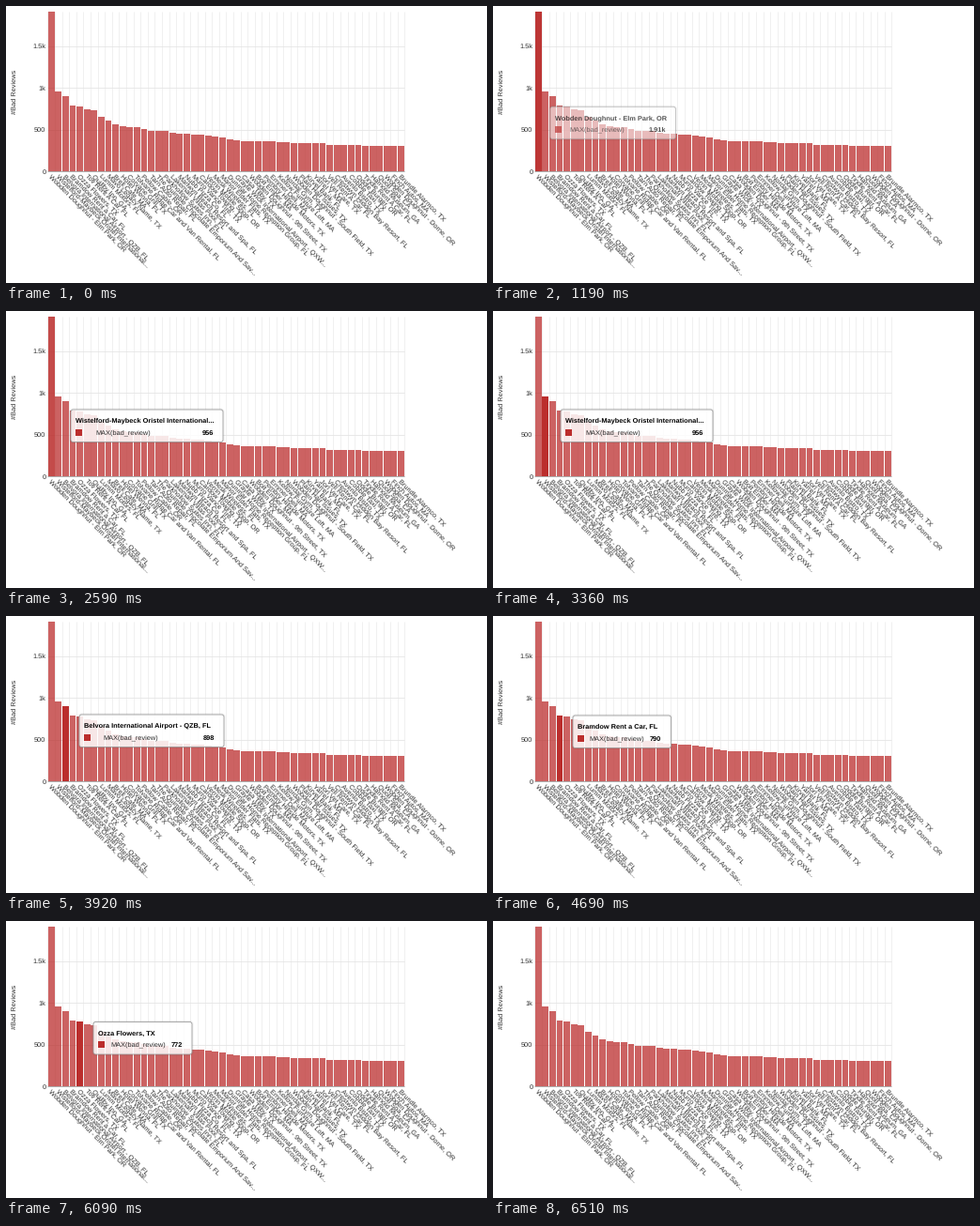
Recreate the animation shown at these times as a matplotlib script. Size 512x295 px, loop 7280 ms.

```python
import numpy as np
import matplotlib.pyplot as plt
from matplotlib.animation import FuncAnimation
from matplotlib.patches import FancyBboxPatch, Rectangle

W, H, DPI = 512, 295, 64
PX = 72 / DPI                      # points per pixel
LOOP, STEP = 7280, 70
LEFT, PITCH, BASE, SCALE = 44.3, 7.6, 176, 0.089
FONT = 7.4
RED = (0.735, 0.18, 0.175)
INK = "#2b2b2b"

# title, value, box width, offset of the measure name
TIPS = [
    ("Wobden Doughnut - Elm Park, OR", "1.91k", 133.5, 21),
    ("Wistelford-Maybeck Oristel International...", "956", 162, 26),
    ("Belvora International Airport - QZB, FL", "898", 154, 25),
    ("Bramdow Rent a Car, FL", "790", 104.5, 17.5),
    ("Ozza Flowers, TX", "772", 105, 18),
]

NAMES = [tip[0] for tip in TIPS] + """Tov Rent A Car, FL
Quillby Inn, GA
Lumm Motors, FL
Mavo Legacy Name, TX
Brell Cafe, MA
Hotel Wenna, FL
Corvane Grill, TX
Tolvane Ridge Car and Van Rental, FL
Pellow Cable, OR
Tarn Auto Repair, FL
The Quimble Chocolate Emporium And Sav...
Parkhollow Suites Inn, FL
Lakemarl Villas Pool, FL
Marlwyn Beach Resort and Spa, FL
Nubb Pizza Co, FL
Murro Vance Tire, TX
Cardow Towing, TX
Verrin Mobile Shop, OR
Mesk Wireless, FL
Manor Elder Flats, TX
Dunmar Home Reception Group, FL
Grayle Wick International Airport - QXW...
Casa Tilby, TX
Wobden Doughnut - 9th Street, TX
Bolt Ember, MA
Pembry Hillside Motors, TX
Emmer Deli, MA
Kellow Furniture Loft, MA
Nordal Gym, TX
Wobden Doughnut - South Field, TX
Plain Hair Issues, TX
Kirvel Bank, FL
Yarrel Y, MA
Jorl Vet Care, TX
Vell Rent A Car, FL
Crestwyn Hidden Bay Resort, FL
Avenlo Bistro, TX
Cobble Taxi, TX
Oddle Burger, OR
Tindle Rent A Car, FL
Harnold Museum, GA
Quoll Spa, CA
Wobden Doughnut - Dorne, OR
Finch Autos, MA
Brundle Alarmco, TX""".splitlines()

VALUES = [1910, 956, 898, 790, 772, 745, 730, 655, 605, 565,
          535, 530, 525, 510, 485, 482, 480, 465, 446, 444,
          441, 439, 430, 412, 402, 385, 370, 365, 362, 360,
          358, 356, 352, 346, 342, 340, 336, 335, 334, 318,
          316, 314, 312, 311, 306, 305, 304, 303, 302, 301]

# Moments when each bar becomes hovered; the last is the pointer leaving.
HOVER = [1050, 2590, 3640, 4410, 5390, 6160]
# Tooltip corner along the pointer's path: time, x, y
PATH = np.array([
    (1120, 60.5, 107.5), (1680, 63.5, 105.5), (2240, 63.5, 105.5),
    (2590, 69, 105), (2940, 72, 105), (3570, 72, 105), (3920, 78, 105),
    (4270, 80, 105.5), (4690, 85, 106), (5320, 85.3, 106),
    (5390, 92, 107), (5670, 93, 107.5),
])

plt.rcParams.update({"font.family": "Liberation Sans", "text.hinting": "none"})
fig = plt.figure(figsize=(W / DPI, H / DPI), dpi=DPI, facecolor="white")
ax = fig.add_axes([0, 0, 1, 1])
ax.set_xlim(0, W)
ax.set_ylim(H, 0)
ax.axis("off")


def label(x, y, text, **style):
    style = {"va": "center_baseline", "color": INK, **style}
    return ax.text(x, y, text, fontsize=FONT * PX, **style)


def line(xs, ys, color, width=0.8):
    ax.plot(xs, ys, color=color, lw=width * PX, zorder=1, solid_capstyle="butt")


def rounded(zorder, **style):
    box = FancyBboxPatch((0, 0), 10, 34.5, zorder=zorder,
                         boxstyle="round,pad=0,rounding_size=2.5", **style)
    return ax.add_patch(box)


def draw_chart():
    right = LEFT + PITCH * len(VALUES)
    for k in range(len(VALUES) + 1):
        x = LEFT + PITCH * k
        line([x, x], [6, BASE], "#ebebeb", 0.7)
    for value, text in [(0, "0"), (500, "500"), (1000, "1k"), (1500, "1.5k")]:
        y = BASE - value * SCALE
        line([LEFT, right], [y, y], "#e4e4e4" if value else "#9a9a9a")
        label(42.5, y, text, ha="right")
    label(9, 91, "#Bad Reviews", ha="center", va="center", rotation=90)
    for i, name in enumerate(NAMES):
        label(LEFT + PITCH * (i + 0.5) - 1, 180, name, ha="left",
              rotation=-45, rotation_mode="anchor")
    return [ax.add_patch(Rectangle((LEFT + PITCH * i + 0.4, BASE), 6.9,
                                   -v * SCALE, fc=RED, ec="none", alpha=0.75,
                                   zorder=2))
            for i, v in enumerate(VALUES)]


bars = draw_chart()
shadow = rounded(4, fc="none", ec="black", lw=3 * PX)
panel = rounded(5, fc="white", ec="none")
border = rounded(6, fc="none", ec="#999999", lw=0.8 * PX)
marker = ax.add_patch(Rectangle((0, 0), 7, 7, fc=RED, ec="none", zorder=7))
title = label(0, 0, "", weight="bold", color="black", zorder=7)
measure = label(0, 0, "MAX(bad_review)", zorder=7)
amount = label(0, 0, "", weight="bold", color="black", ha="right", zorder=7)
tooltip = [(shadow, 0.06), (panel, 0.85), (border, 1), (marker, 1),
           (title, 1), (measure, 1), (amount, 1)]


def ease_out(age, length=300):
    return 1 - (1 - np.clip(age / length, 0, 1)) ** 3


def update(frame):
    t = frame * STEP
    for i, bar in enumerate(bars[:len(TIPS)]):
        glow = ease_out(t - HOVER[i]) * (1 - ease_out(t - HOVER[i + 1] + 70))
        bar.set_alpha(0.75 + 0.25 * glow)

    opacity = (np.clip((t - HOVER[0]) / 210, 0, 1)
               * (1 - np.clip((t - HOVER[-1]) / 280, 0, 1)))
    for artist, strength in tooltip:
        artist.set_visible(opacity > 0)
        artist.set_alpha(strength * opacity)

    current = int(np.clip(np.searchsorted(HOVER, t, "right") - 1,
                          0, len(TIPS) - 1))
    heading, value, width, offset = TIPS[current]
    x, y = (np.interp(t, PATH[:, 0], PATH[:, k]) for k in (1, 2))
    for box in (shadow, panel, border):
        box.set_bounds(x, y, width, 34.5)
    marker.set_xy((x + 5, y + 20.5))
    title.set_position((x + 5, y + 11.5))
    title.set_text(heading)
    measure.set_position((x + offset, y + 24))
    amount.set_position((x + width - 10, y + 24))
    amount.set_text(value)
    return bars


anim = FuncAnimation(fig, update, frames=LOOP // STEP, interval=STEP,
                     repeat=True, repeat_delay=0, blit=False)
plt.show()
```
